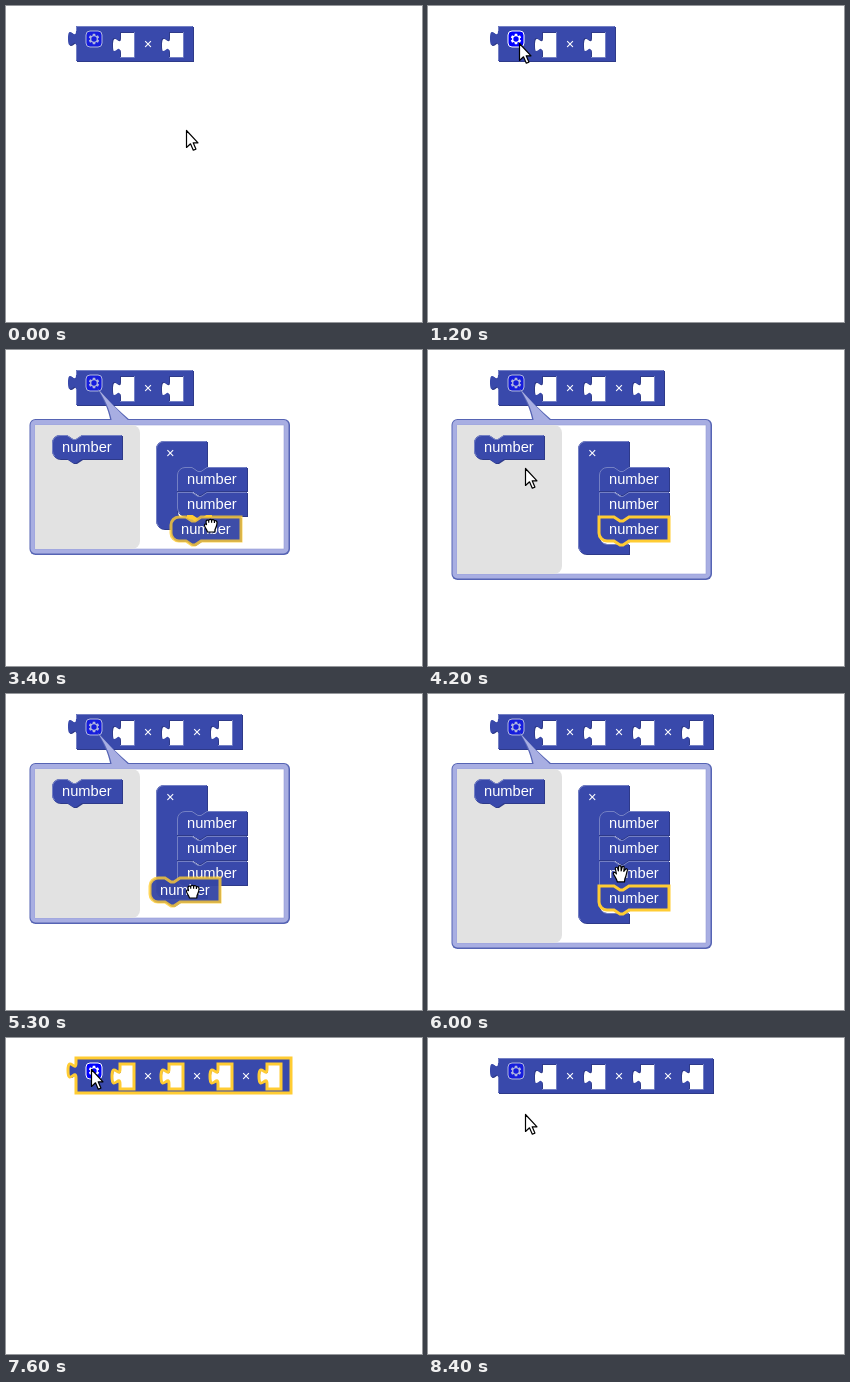
These frames come from a looping animation (416 by 316 pixels, 9.4 s). An HTML page:

```html
<!DOCTYPE html>
<html lang="en">
<head>
<meta charset="utf-8">
<title>Block mutator</title>
<style>
html, body { margin: 0; width: 100%; height: 100%; overflow: hidden; background: #fff; }
svg { display: block; width: 416px; height: 316px; }
text { font: 14.667px "Liberation Sans", Arial, sans-serif; fill: #fff; }
.body { fill: #3949ab; }
.dark { fill: #2e3a89; }
.light { fill: none; stroke: #7480c4; }
.chosen { stroke: #fc3; stroke-width: 3; }
.cursor { fill: #fff; stroke: #000; stroke-width: 1.2; stroke-linejoin: round; }
</style>
</head>
<body>
<svg id="stage" viewBox="0 0 416 316"></svg>
<script>
const LOOP = 9400, STEP = 100;
const stage = document.getElementById('stage');

// Pointer path: time, x, y
const KEYS = [
  [0, 180, 124], [100, 180, 124], [1100, 88, 35], [1200, 91, 37], [1700, 91, 37],
  [2200, 85, 88], [2400, 86, 93], [2500, 86, 93], [3400, 205, 175],
  [3500, 208.5, 174.5], [4200, 97, 118], [4500, 89, 98], [4700, 89, 98],
  [5300, 187, 197], [5700, 211.5, 205.5], [5800, 211.5, 205.5], [6800, 89, 37],
  [6900, 89, 37], [7100, 85, 31], [7700, 85, 31], [8100, 97, 76], [LOOP, 97, 76]
];
const DRAGS = [[2600, 3600], [4800, 5900]];
const TRAY = { x: 46, y: 85 };
const NOTCH = 'l6,4 3,0 6,-4';
const NOTCH_BACK = 'l-6,4 -3,0 -6,-4';
const TAB_DOWN = 'v5c0,10 -8,-8 -8,7.5s8,-2.5 8,7.5';

const within = (t, a, b) => t >= a && t < b;
const inBox = (p, x, y, w, h) => within(p.x, x, x + w) && within(p.y, y, y + h);
const at = (x, y, body) => `<g transform="translate(${x} ${y})">${body}</g>`;
const label = (x, y, s) => `<text x="${x}" y="${y}">${s}</text>`;

function pointer(t) {
  let i = 1;
  while (i < KEYS.length - 1 && KEYS[i][0] < t) i++;
  const [t0, x0, y0] = KEYS[i - 1], [t1, x1, y1] = KEYS[i];
  const u = (t - t0) / (t1 - t0);
  const e = (u + u * u * (3 - 2 * u)) / 2;
  return { x: x0 + (x1 - x0) * e, y: y0 + (y1 - y0) * e };
}

function shape(d, light, chosen) {
  return `<path class="dark" fill-rule="evenodd" transform="translate(1 1)" d="${d}"/>` +
    `<path class="body${chosen ? ' chosen' : ''}" fill-rule="evenodd" d="${d}"/>` +
    (chosen ? '' : `<path class="light" d="${light}"/>`);
}

function numberBlock(x, y, o = {}) {
  const w = 70, h = 24;
  const top = o.joinTop ? 'M0,0' : 'M0,8A8,8 0 0 1 8,0';
  const end = o.joinEnd ? 'H0' : 'H8a8,8 0 0 1 -8,-8';
  const d = `${top}H15${NOTCH}H${w}V${h}H30${NOTCH_BACK}${end}z`;
  const rise = o.joinEnd ? `M.5,${h}` : `M2.8,${h - 2.8}A7.5,7.5 0 0 1 .5,${h - 8}`;
  const turn = o.joinTop ? 'V.5' : 'V8A7.5,7.5 0 0 1 8,.5';
  const light = `${rise}${turn}H15${NOTCH}H${w - .5}`;
  const look = o.dragged ? ' fill-opacity=".8" stroke-opacity=".8"' : '';
  return at(x, y, `<g${look}>${shape(d, light, o.chosen)}</g>` + label(10, 17, 'number'));
}

function gear(hover) {
  const pts = [];
  for (let i = 0; i < 6; i++) {
    for (const [da, r] of [[-22, 3.9], [-13, 5.4], [13, 5.4], [22, 3.9]]) {
      const a = (i * 60 + 90 + da) * Math.PI / 180;
      pts.push((8 + r * Math.cos(a)).toFixed(2) + ',' + (8 + r * Math.sin(a)).toFixed(2));
    }
  }
  return at(80, 25, `<g opacity="${hover ? 1 : .6}">` +
    '<rect width="16" height="16" rx="4" fill="#00f" stroke="#fff"/>' +
    `<polygon points="${pts.join(' ')}" fill="#fff"/>` +
    '<circle cx="8" cy="8" r="2.7" fill="#00f"/></g>');
}

function productBlock(n, chosen, hover) {
  const w = 19 + 49 * n, h = 35;
  let d = `M0,0H${w}V${h}H0V20c0,-10 -8,8 -8,-7.5s8,2.5 8,-7.5z`;
  let light = `M.5,${h - .5}V19M.5,5V.5H${w - .5}`;
  let signs = '';
  for (let i = 0; i < n; i++) {
    const x = 44 + 49 * i;
    d += `M${x},6${TAB_DOWN}V31H${x + 14}V6z`;
    light += `M${x + 14.5},6V31.5H${x}`;
    if (i) signs += label(x - 25.3, 23, '×');
  }
  return at(70, 20, shape(d, light, chosen) + signs) + gear(hover);
}

function container(n) {
  const h = 38 + 25 * n;
  const d = `M0,8A8,8 0 0 1 8,0H51V26${NOTCH_BACK}h-7a8,8 0 0 0 -8,8V${h - 18}` +
    `a8,8 0 0 0 8,8H51V${h}H8a8,8 0 0 1 -8,-8z`;
  const light = `M2.8,${h - 2.8}A7.5,7.5 0 0 1 .5,${h - 8}V8A7.5,7.5 0 0 1 8,.5H50.5` +
    `M23.8,${h - 12}A8.5,8.5 0 0 0 29,${h - 9.5}H50.5`;
  return at(150, 91, shape(d, light) + label(10, 17, '×'));
}

function bubble(n) {
  const h = 86 + 25 * n;
  return '<path d="M91,38C97,48 102,58 104.500,71H125C113,61 102,50 91,38z" fill="#5664b4"/>' +
    `<rect x="23.500" y="69" width="260.500" height="${h}" rx="6" fill="#5664b4"/>` +
    `<rect x="24.500" y="70" width="258" height="${h - 2.5}" rx="5" fill="#a8aee2"/>` +
    '<path d="M92,39C98,48 104,59 106,72H124C112,61 102,50 92,39z" fill="#a8aee2"/>' +
    `<rect x="29" y="75" width="249" height="${h - 12}" fill="#fff" stroke="#949cd6" stroke-width=".6"/>` +
    `<path d="M29,75h97a8,8 0 0 1 8,8v${h - 28}a8,8 0 0 1 -8,8h-97z" fill="#e2e2e2"/>`;
}

function cursor(p, kind) {
  const forms = {
    arrow: 'M.5,.5V17.500L4.500,13.800L7.300,20.200L9.900,19.100L7.200,12.800H12z',
    open: 'M-3.500,8C-4,5 -7.500,1 -7.500,-.5C-7,-2 -5.500,-1.500 -4.500,0L-5.500,-5C-5.800,-7 -3.500,-7.200 -3.200,-5.500' +
      'L-2.500,-3L-2.300,-7C-2,-8.800 0,-8.800 .1,-7L.3,-3L1.200,-6.600C1.800,-8.200 3.600,-7.600 3.300,-6L2.900,-2.500' +
      'L4.500,-4.600C5.500,-5.800 7,-4.800 6.400,-3.200C5.500,-1 5.600,2 4,5L3.600,8z',
    closed: 'M-3.500,7C-4,4 -7,2 -6.500,0C-6,-1.500 -5,-1 -4.500,-.5L-5,-3C-5,-5 -3,-5.500 -2.300,-4.200' +
      'C-2,-6 .2,-6 .6,-4.600C1.200,-6 3.200,-5.600 3.400,-4C4.800,-5 6.200,-3.800 6,-2C6,1 5.200,2 4,4.500L3.800,7z' +
      'M-2.300,-4.200v2M.6,-4.600v2.400M3.400,-4v2'
  };
  return at(p.x, p.y, `<path class="cursor" d="${forms[kind]}"/>`);
}

function draw(t) {
  const p = pointer(t);
  const n = t < 3600 ? 2 : t < 5900 ? 3 : 4;
  const isOpen = within(t, 1800, 7600);
  const drag = DRAGS.find(([a, b]) => within(t, a, b));
  const rootChosen = within(t, 1700, 2600) || within(t, 7500, 8300);
  const lastChosen = within(t, 3600, 4800) || within(t, 5900, 7500);
  const overGear = inBox(p, 79.5, 24.5, 17, 17);

  let out = productBlock(n, rootChosen, overGear);
  if (isOpen) {
    out += bubble(n) + numberBlock(TRAY.x, TRAY.y) + container(n);
    for (let i = 0; i < n; i++) {
      out += numberBlock(171, 117 + 25 * i, {
        joinTop: i > 0, joinEnd: i < n - 1, chosen: lastChosen && i === n - 1
      });
    }
  }
  if (drag) {
    const from = pointer(drag[0] - STEP);
    const x = TRAY.x + p.x - from.x, y = TRAY.y + p.y - from.y;
    const endY = 117 + 25 * n;
    if (Math.hypot(x - 171, y - endY) < 15) {
      out += `<path d="M181,${endY}h5${NOTCH}h5" fill="none" stroke="#fc3" stroke-width="4"/>`;
    }
    out += numberBlock(x, y, { chosen: true, dragged: true });
  }

  const overRoot = !overGear && inBox(p, 70, 20, 19 + 49 * n, 35);
  const overInner = isOpen && (inBox(p, TRAY.x, TRAY.y, 70, 24) ||
    inBox(p, 150, 91, 51, 38 + 25 * n) || inBox(p, 171, 117, 70, 25 * n));
  out += cursor(p, drag ? 'closed' : overRoot || overInner ? 'open' : 'arrow');
  stage.innerHTML = out;
}

let shown = -1;
function tick() {
  const t = Math.floor(performance.now() % LOOP / STEP) * STEP;
  if (t !== shown) draw(shown = t);
  requestAnimationFrame(tick);
}
tick();
</script>
</body>
</html>
```
